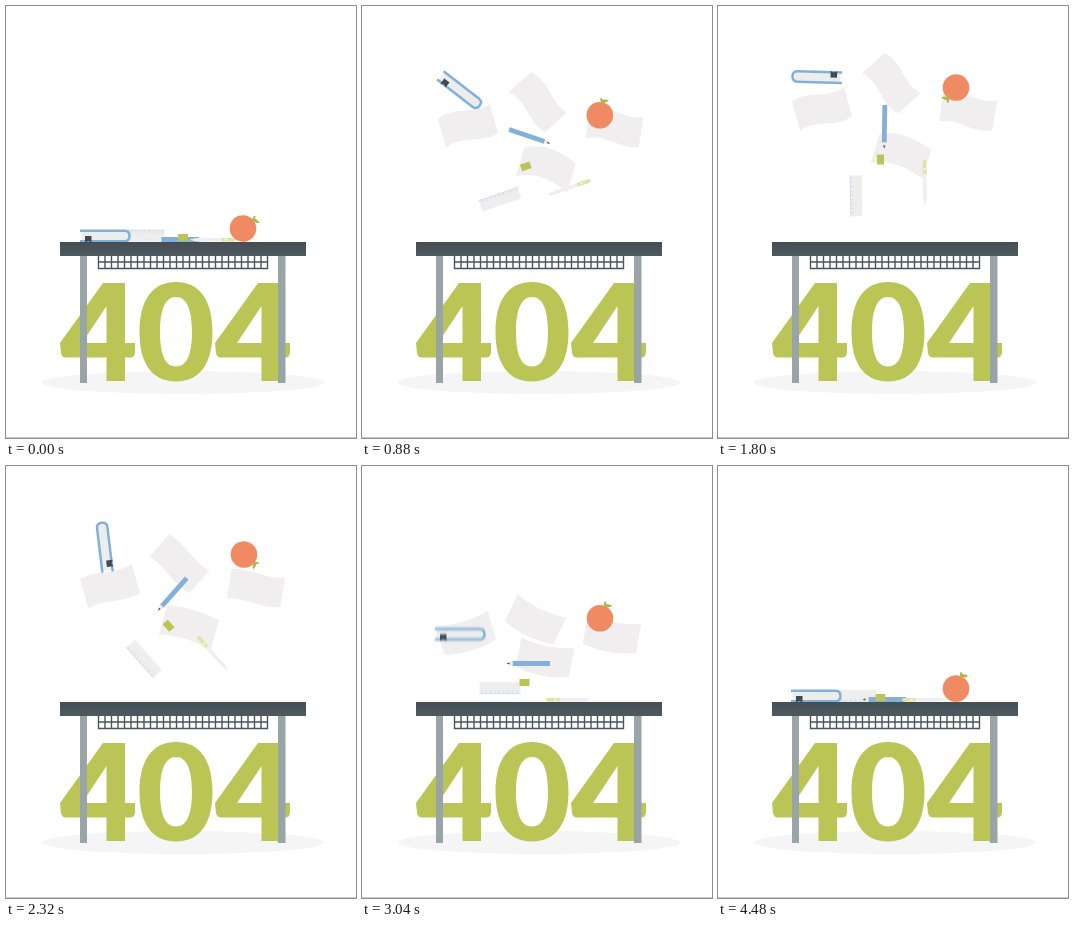
Recreate the animation shown at these times as an HTML page. Size 350 px wide and 432 px high, loop 4520 ms.

```html
<!DOCTYPE html>
<html lang="en">
<head>
<meta charset="utf-8">
<title>404</title>
<style>
html, body { margin: 0; width: 100%; height: 100%; overflow: hidden; background: #fff; }
svg { display: block; width: 100vw; height: 100vh; }
</style>
</head>
<body>
<svg viewBox="0 0 350 432">
  <defs>
    <path id="four" fill-rule="evenodd" d="M43 277H65V337H75V346Q75 351.5 70 351.5H65V375H46.5V351.5H6Q2 351.5 1 347L0 337ZM46.5 300V337H22Z"/>
    <linearGradient id="top" x2="0" y2="1"><stop stop-color="#444e54"/><stop offset="1" stop-color="#4f5a60"/></linearGradient>
  </defs>
  <ellipse cx="177" cy="376.5" rx="141" ry="11.5" fill="#f5f5f5"/>
  <g fill="#bac556">
    <use href="#four" x="54"/>
    <path fill-rule="evenodd" d="M170 276C195 276 206.500 296 206.500 326S195 375.500 170 375.500S133.500 356 133.500 326S145 276 170 276ZM170 291C159 291 154 304 154 326S159 360.500 170 360.500S186 348 186 326S181 291 170 291Z"/>
    <use href="#four" x="209"/>
  </g>
  <path id="basket" fill="none" stroke="#4a545b" stroke-width="1.4"/>
  <path d="M74 250h7v127H74zM272 250h7.500v127H272z" fill="#99a4a7"/>
  <g id="papers" fill="#f0eeef"></g>
  <g id="things"></g>
  <rect x="54" y="236" width="246" height="14" fill="url(#top)"/>
  <path d="M0 431.500H350" stroke="#ccc"/>
</svg>
<script>
const LOOP = 4520, LAUNCH = 490, RISE = 858, APEX = 1700;
const NS = 'http://www.w3.org/2000/svg';
const $ = id => document.getElementById(id);
const clamp = v => Math.max(0, Math.min(1, v));
const mix = (a, b, u) => a + (b - a) * u;
const smooth = u => u * u * (3 - 2 * u);

let grid = 'M92.5 250V262.5H261.5V250M92 256H262';
for (let i = 1; i < 26; i++) grid += `M${92.5 + i * 6.5} 250V262`;
$('basket').setAttribute('d', grid);

let ticks = 'M-20.5 -5.5h41';
for (let x = -17; x < 20; x += 4.4) ticks += `M${x} -6v3.5`;

const art = {
  book: `<rect x="-24" y="-4.5" width="46" height="9" rx="2" fill="#eceded"/>
    <path d="M-25.5 -5.200H19Q24 -5.200 24 0T19 5.200H-25.500" fill="none" stroke="#82b0d8" stroke-width="2.5"/>
    <path d="M-20.500 0h6.500v6.500l-3.200-1.500-3.300 1.500z" fill="#414a51"/>`,
  ruler: `<rect x="-20.500" y="-6" width="41" height="12" fill="#efeeef"/>
    <path d="${ticks}" stroke="#cfdfec" stroke-width=".9"/>`,
  pencil: `<path d="M-21.500 -2.400H16V2.400H-21.500z" fill="#82b0d8"/>
    <path d="M16 -2.400L21.500 0 16 2.400z" fill="#efeae4"/>
    <path d="M19 -1.100L22 0 19 1.100z" fill="#414a51"/>`,
  eraser: '<rect x="-5" y="-3.500" width="10" height="7" fill="#bac556"/>',
  pen: `<path d="M-23 0L-16 -1.800H21V1.800H-16z" fill="#f0eeee"/>
    <path d="M9 -1.800H21Q23 -1.800 23 0T21 1.800H9z" fill="#dfe3a4"/><path d="M12 0h3" stroke="#fff"/>`,
  apple: `<circle r="13.300" fill="#ef8a62"/>
    <path d="M3.500 -11Q4 -17 12.500 -12.500Q8 -9.500 3.500 -12.500ZM4.500 -12Q3 -16 5.500 -17Q7 -14 4.500 -12Z" fill="#a9bb45"/>`
};

// from: x at rest, x: x in the air, y: resting height, lift: height of the throw.
const things = [
  { name: 'ruler', from: 138, x: 138, y: 229.8, lift: 40, spin: -180, land: 3140 },
  { name: 'pencil', from: 177, x: 166.5, y: 233.5, lift: 113, spin: 180, land: 3224 },
  { name: 'eraser', from: 177, x: 162.5, y: 231.5, lift: 78, spin: -180, land: 3140 },
  { name: 'pen', from: 206.5, x: 206.8, y: 233.8, lift: 57, spin: -180, land: 2780 },
  { name: 'book', from: 99.5, x: 98.5, y: 230, lift: 159, spin: 360, land: 3280 },
  { name: 'apple', from: 237, x: 238, y: 222.5, lift: 141, spin: -387, land: 3387, tilt: 27, drift: 9, delay: 60 }
];

// Sheets swing from one angle to another as they sink.
const sheets = [
  { from: 127, x: 104, lift: 133, tilt: -16, end: -17 },
  { from: 199, x: 173.5, lift: 159, tilt: 48, end: 2 },
  { from: 192, x: 183, lift: 85, tilt: 17, end: 5, arch: 8 },
  { from: 277, x: 250, lift: 131, tilt: 9, end: 11 }
].map(s => ({ ...s, y: 235, drift: 7, land: 3775, sheet: true }));

const rise = (o, t) => 1 - (1 - clamp((t - LAUNCH - (o.delay || 0)) / RISE)) ** 4;
const fall = (o, t) => clamp((t - APEX) / (o.land - APEX)) ** (o.sheet ? 1.65 : 3);

function heightAt(o, t) {
  const drift = o.drift || 0;
  const hover = drift * smooth(clamp((t - 1200) / (APEX - 1200)));
  const thrown = (o.lift - drift) * rise(o, t) + hover;
  return thrown * (1 - fall(o, t));
}

function angleAt(o, t) {
  if (o.sheet) return mix(o.tilt, o.end, fall(o, t));
  return (o.tilt || 0) + o.spin * clamp((t - 640) / 2300);
}

// Sheets arch when thrown, ripple in the air, sag when sinking and flatten on the desk.
function sheetPath(o, t) {
  const up = rise(o, t), down = fall(o, t), calm = clamp(1 - down * 3);
  const h = 15 * clamp((t - LAUNCH) / 80) * clamp((1 - down) / .3);
  const flat = clamp(h / 8);
  const bow = flat * (16 * (1 - up) + (o.arch || 0) * up * calm - 20 * down * down);
  const wave = flat * (o.arch ? 2 : 8) * up * calm;
  const a = bow + wave, b = bow - wave;
  o.wrap.style.display = h > .3 ? '' : 'none';
  return `M-27 ${-h}C-9 ${-h - a} 9 ${-h - b} 27 ${-h}L27 ${h}C9 ${h - b} -9 ${h - a} -27 ${h}Z`;
}

function build(o, i) {
  o.filter = 'blur' + (o.name || i);
  document.querySelector('defs').insertAdjacentHTML('beforeend',
    `<filter id="${o.filter}" filterUnits="userSpaceOnUse" width="350" height="432" color-interpolation-filters="sRGB"><feGaussianBlur/></filter>`);
  o.blur = $(o.filter).firstElementChild;
  o.wrap = document.createElementNS(NS, 'g');
  o.node = document.createElementNS(NS, o.sheet ? 'path' : 'g');
  if (!o.sheet) o.node.innerHTML = art[o.name];
  o.wrap.append(o.node);
  $(o.sheet ? 'papers' : 'things').append(o.wrap);
}

function place(o, t) {
  const x = mix(o.from, o.x, rise(o, t)), y = o.y - heightAt(o, t);
  o.node.setAttribute('transform', `translate(${x} ${y}) rotate(${angleAt(o, t)})`);
  if (o.sheet) o.node.setAttribute('d', sheetPath(o, t));
  const speed = Math.abs(heightAt(o, t + 4) - heightAt(o, t - 4)) / 8;
  if (speed > .04) {
    const s = Math.min(3, speed * 4.5);
    o.blur.setAttribute('stdDeviation', `${s * .3} ${s}`);
    o.wrap.setAttribute('filter', `url(#${o.filter})`);
  } else o.wrap.removeAttribute('filter');
}

const items = [...sheets, ...things];
items.forEach(build);

const start = performance.now();
function tick() {
  const t = (performance.now() - start) % LOOP;
  items.forEach(o => place(o, t));
  requestAnimationFrame(tick);
}
tick();
</script>
</body>
</html>
```
